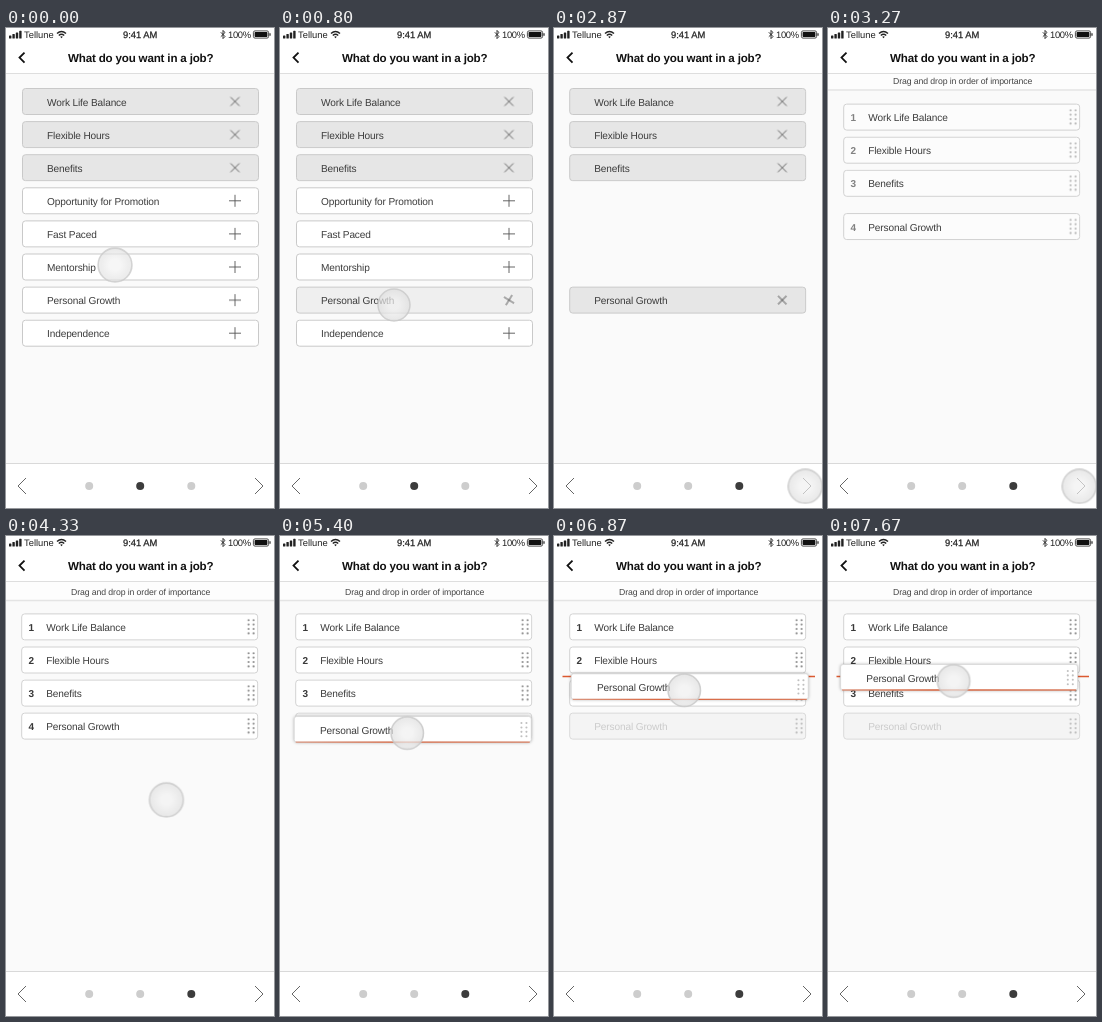
Write an HTML page that moves like this. It is 268 px wide and 480 px high and loops after 8000 ms.

```html
<!DOCTYPE html>
<html lang="en">
<head>
<meta charset="utf-8">
<title>Job preferences</title>
<style>
html, body { margin: 0; width: 100%; height: 100%; overflow: hidden; background: #fafafa; }
svg { display: block; width: 100vw; height: 100vh; font-family: "Liberation Sans", Arial, sans-serif; text-rendering: geometricPrecision; }
.label { font-size: 10.1px; letter-spacing: -.13px; fill: #3c3c3c; }
.num { font-size: 10px; font-weight: bold; fill: #383838; }
.box { fill: #fff; stroke: #c9c9c9; }
.icon { fill: none; stroke: #555; stroke-width: .9; }
.grip { fill: none; stroke: #8c8c8c; stroke-width: 2.1; stroke-linecap: round; stroke-dasharray: 0 4.4; }
.status { font-size: 9.4px; fill: #222; }

/* 1% = 80 ms */
.rows, .rest, .keep, .grow, .chosen, .growBox, .growText, .growNum, .growGrip, .cross, .plus,
.intro, .bar, .dot, .next, .cursor, .press, .item, .drop { animation: 8s linear infinite both; }

.rows { animation-name: nudge; }
@keyframes nudge { 0%, 33.4% { transform: none; } 33.5%, 100% { transform: translateX(-.8px); } }

.rest { animation-name: rest; }
@keyframes rest { 0%, 33.2% { opacity: 1; } 35.7%, 100% { opacity: 0; } }

.keep { animation-name: keep; }
@keyframes keep {
  0%, 36% { transform: none; animation-timing-function: ease-in-out; }
  42.3%, 100% { transform: translateY(17.4px); }
}
.grow { animation-name: grow; }
@keyframes grow {
  0%, 36% { transform: none; animation-timing-function: ease-in-out; }
  42.3%, 100% { transform: translateY(-82px); }
}
.chosen { animation-name: chosen; }
@keyframes chosen {
  0%, 36.5% { fill: #e6e6e6; stroke: #c9c9c9; }
  41.5%, 100% { fill: #fff; stroke: #d2d2d2; }
}
.growBox { animation-name: growBox; }
@keyframes growBox {
  0%, 7.4% { fill: #fff; stroke: #c9c9c9; }
  11.5%, 36.5% { fill: #e6e6e6; stroke: #c9c9c9; }
  41.5%, 61.5% { fill: #fff; stroke: #d2d2d2; }
  64.5%, 100% { fill: #f4f4f4; stroke: #d9d9d9; }
}
.growText { animation-name: growText; }
@keyframes growText { 0%, 61.5% { fill: #3c3c3c; } 64.5%, 100% { fill: #cbcbcb; } }

.cross { animation-name: cross; }
@keyframes cross { 0%, 36.3% { opacity: 1; } 39.5%, 100% { opacity: 0; } }
.plus { animation-name: plus; }
@keyframes plus {
  0%, 7.4% { transform: none; animation-timing-function: ease-in-out; }
  11.6%, 100% { transform: rotate(45deg); }
}
.intro { animation-name: intro; }
@keyframes intro { 0%, 38.5% { opacity: 0; } 42.3%, 100% { opacity: 1; } }
.growNum { animation-name: growNum; }
@keyframes growNum { 0%, 38.5% { opacity: 0; } 42.3%, 61.5% { opacity: 1; } 64.5%, 100% { opacity: 0; } }
.growGrip { animation-name: growGrip; }
@keyframes growGrip { 0%, 38.5% { opacity: 0; } 42.3%, 61.5% { opacity: 1; } 64.5%, 100% { opacity: .55; } }

.bar { animation-name: bar; }
@keyframes bar {
  0%, 36.5% { transform: translateY(-20px); animation-timing-function: ease-in-out; }
  42.3%, 100% { transform: none; }
}
.dot { animation-name: dot; }
@keyframes dot { 0%, 33.2% { fill: #3c3c3c; } 35.5%, 100% { fill: #cdcdcd; } }
.next { animation-name: next; }
@keyframes next { 0%, 33.2% { fill: #cdcdcd; } 35.5%, 100% { fill: #3c3c3c; } }

.cursor { animation-name: move; }
@keyframes move {
  0%, .5% { transform: translate(109px, 237px); animation-timing-function: ease-in-out; }
  5.1%, 13.7% { transform: translate(114px, 277px); animation-timing-function: cubic-bezier(.4, 0, .8, .8); }
  20.9% { transform: translate(215.5px, 434px); animation-timing-function: cubic-bezier(.2, .4, .6, 1); }
  27.5%, 45.5% { transform: translate(251.3px, 458.3px); animation-timing-function: cubic-bezier(.4, 0, .7, .7); }
  54.1% { transform: translate(160.7px, 264.5px); }
  55.9% { transform: translate(146px, 232px); animation-timing-function: cubic-bezier(.3, .6, .6, 1); }
  61%, 62% { transform: translate(128.5px, 194.5px); }
  65% { transform: translate(127.5px, 194px); }
  67.5% { transform: translate(127.2px, 197px); animation-timing-function: ease-out; }
  71.3% { transform: translate(134px, 203px); animation-timing-function: ease-in-out; }
  78.4% { transform: translate(145.2px, 183px); animation-timing-function: ease-in-out; }
  88.4% { transform: translate(128px, 150px); animation-timing-function: ease-out; }
  95.9%, 100% { transform: translate(125.6px, 145px); }
}
.press { animation-name: press; }
@keyframes press {
  0%, 7.5% { opacity: .9; transform: none; }
  9.3% { opacity: 1; transform: scale(.92); }
  11.6%, 14% { opacity: .9; transform: none; }
  17%, 24% { opacity: .7; }
  27.5%, 31.5% { opacity: 1; transform: none; }
  31.7%, 60.9% { opacity: .95; transform: none; }
  63% { opacity: 1; transform: scale(.93); }
  66%, 100% { opacity: 1; transform: scale(.96); }
}
.item { animation-name: item; filter: drop-shadow(0 .5px 1.5px rgba(0, 0, 0, .28)); }
@keyframes item { 0%, 61.5% { opacity: 0; } 64.5%, 100% { opacity: 1; } }
.drop { animation-name: drop; }
@keyframes drop { 0%, 83% { opacity: 0; } 85.5%, 100% { opacity: 1; } }
</style>
</head>
<body>
<svg viewBox="0 0 268 480" preserveAspectRatio="none">
  <defs>
    <radialGradient id="touch">
      <stop offset=".3" stop-color="#f1f1f1" stop-opacity=".72"/>
      <stop offset="1" stop-color="#dfdfdf" stop-opacity=".72"/>
    </radialGradient>
    <linearGradient id="edge" gradientUnits="userSpaceOnUse" x1="-112" y1="0" x2="123" y2="0">
      <stop offset="0" stop-color="#d9653f" stop-opacity=".6"/>
      <stop offset=".4" stop-color="#d9653f"/>
      <stop offset="1" stop-color="#d9653f" stop-opacity=".8"/>
    </linearGradient>
    <path id="grip" class="grip" d="M-2.5-6.6V7M2.5-6.6V7"/>
  </defs>
  <rect width="268" height="480" fill="#fafafa"/>

  <g class="rows" id="rows"></g>
  <path class="drop" d="M8.5 140.5H261" stroke="#dc5a30" stroke-width="1.6"/>

  <g class="bar">
    <rect y="45" width="268" height="19.5" fill="#fdfdfd"/>
    <path d="M0 64.5H268" stroke="#e4e4e4" stroke-width="1.4"/>
    <text x="65" y="58.8" font-size="8.7" letter-spacing="-.09" fill="#444">Drag and drop in order of importance</text>
  </g>

  <rect width="268" height="45" fill="#fff"/>
  <path d="M0 45.5H268" stroke="#dedede"/>
  <g fill="#222">
    <rect x="3" y="7.5" width="2.4" height="3" rx=".6"/>
    <rect x="6.4" y="6" width="2.4" height="4.5" rx=".6"/>
    <rect x="9.8" y="4.4" width="2.4" height="6.1" rx=".6"/>
    <rect x="13.2" y="2.8" width="2.4" height="7.7" rx=".6"/>
  </g>
  <text class="status" x="18" y="10">Tellune</text>
  <g fill="none" stroke="#222" stroke-width="1.4">
    <path d="M51 5.6Q55.5 1.4 60 5.6M52.8 7.5Q55.5 5 58.2 7.5"/>
    <path d="M54.2 8.8L55.5 10.2L56.8 8.8Q55.5 7.8 54.2 8.8Z" fill="#222" stroke="none"/>
  </g>
  <text class="status" x="117" y="10" stroke="#222" stroke-width=".25">9:41 AM</text>
  <path d="M214.8 4.3L219 8.5L217 10.6V2.4L219 4.5L214.8 8.7" fill="none" stroke="#222" stroke-width=".9"/>
  <text class="status" x="222" y="10" letter-spacing="-.3">100%</text>
  <rect x="247.4" y="2.9" width="15.2" height="7.2" rx="1.6" fill="none" stroke="#222" stroke-width=".8"/>
  <rect x="248.6" y="4.1" width="12.8" height="4.8" rx=".7" fill="#111"/>
  <path d="M264 5.2V7.8" stroke="#222" stroke-width="1.2"/>
  <path d="M18.5 24.6L13.5 29.6L18.5 34.6" fill="none" stroke="#111" stroke-width="1.8"/>
  <text x="62" y="34" font-size="11.6" font-weight="bold" letter-spacing="-.18" fill="#111">What do you want in a job?</text>

  <rect y="435" width="268" height="45" fill="#fff"/>
  <path d="M0 435.5H268" stroke="#d9d9d9"/>
  <path class="icon" d="M20 450L12 458L20 466M249 450L257 458L249 466"/>
  <circle cx="83.2" cy="458" r="4" fill="#cdcdcd"/>
  <circle class="dot" cx="134.2" cy="458" r="4"/>
  <circle class="next" cx="185.3" cy="458" r="4"/>

  <g class="cursor">
    <g class="item">
      <rect x="-113" y="-16.5" width="237" height="25.5" rx="2.5" fill="#fff" stroke="#d9d9d9" stroke-width=".8"/>
      <path d="M-111.5 9H122.5" stroke="url(#edge)" stroke-width="1.3"/>
      <text class="label" x="-87.3" y=".6">Personal Growth</text>
      <use href="#grip" x="116.7" y="-3.4" opacity=".55"/>
    </g>
    <g class="press">
      <circle r="16.9" fill="url(#touch)" stroke="#c8c8c8" stroke-opacity=".85" stroke-width="1.6"/>
    </g>
  </g>
</svg>
<script>
const names = ["Work Life Balance", "Flexible Hours", "Benefits", "Opportunity for Promotion",
  "Fast Paced", "Mentorship", "Personal Growth", "Independence"];
const CROSS = "M-4.4-4.4L4.4 4.4M-4.4 4.4L4.4-4.4";
const PLUS = "M-6 0H6M0-6V6";

const icon = (d, cls = "") =>
  `<g transform="translate(212.5 13)"><path class="icon ${cls}" d="${d}"/></g>`;
const order = (n, num, grip) =>
  `<text class="num ${num}" x="6.9" y="17.2">${n}</text><g class="${grip}"><use href="#grip" x="229.3" y="12.8"/></g>`;

function row(name, i) {
  const grow = i === 6, keep = i < 3;
  const kind = grow ? "grow" : keep ? "keep" : "rest";
  const box = grow ? "growBox" : keep ? "chosen" : "";
  let extra = icon(PLUS);
  if (keep) extra = `<g class="cross">${icon(CROSS)}</g>` + order(i + 1, "intro", "intro");
  if (grow) extra = `<g class="cross">${icon(PLUS, "plus")}</g>` + order(4, "growNum", "growGrip");
  return `<g transform="translate(16.5 ${60.5 + 33.1 * i})"><g class="${kind}">
    <rect class="box ${box}" width="236" height="26" rx="3"/>
    <text class="label ${grow ? "growText" : ""}" x="24.5" y="17">${name}</text>${extra}</g></g>`;
}
document.getElementById("rows").innerHTML = names.map(row).join("");
</script>
</body>
</html>
```
